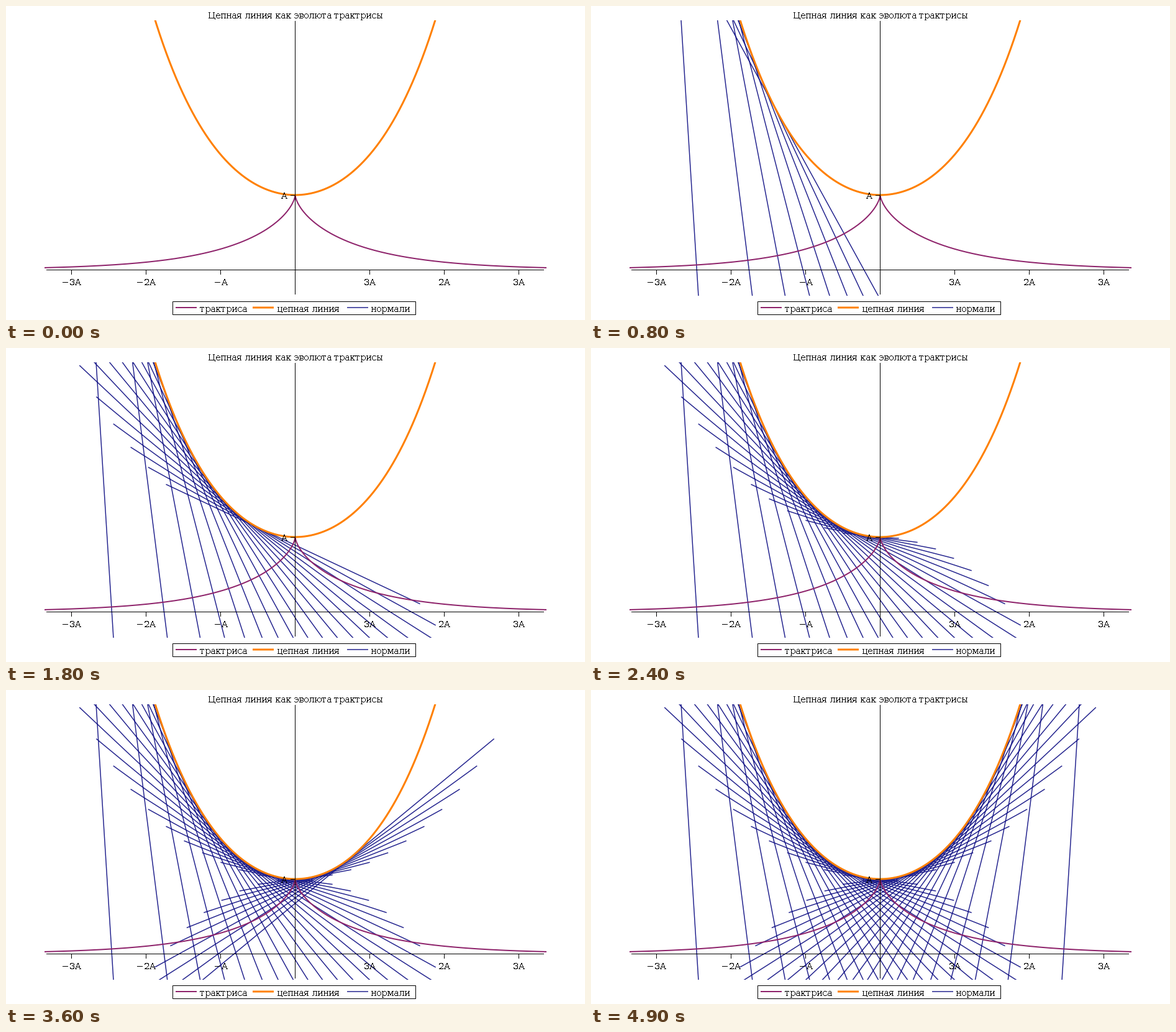
A matplotlib script for the animation above (5100 ms loop, 932 px wide and 505 px high).

```python
import numpy as np
import matplotlib.pyplot as plt
from matplotlib.animation import FuncAnimation
from matplotlib.patches import Rectangle

W, H, DPI = 932, 505, 100
PX = 72 / DPI                      # one pixel in points
CX, CY, UX, UY = 465.5, 424.0, 120.1, 120.0
MAROON, ORANGE, NAVY = "#8E236B", "#FF8000", "#23238E"
FRAMES, STEPS = 51, 50

# Crisp, fully hinted text
plt.rcParams.update({"font.family": "DejaVu Serif", "text.antialiased": False,
                     "text.hinting": "native", "text.hinting_factor": 1})
fig = plt.figure(figsize=(W / DPI, H / DPI), dpi=DPI, facecolor="white")
ax = fig.add_axes([0, 0, 1, 1])
ax.set_xlim(0, W)
ax.set_ylim(H, 0)
ax.axis("off")
view = Rectangle((62, 23), 808, 443, transform=ax.transData)


def to_px(x, y):
    return CX + UX * np.asarray(x), CY - UY * np.asarray(y)


def curve(x, y, color, width, z):
    line, = ax.plot(*to_px(x, y), color=color, lw=width * PX, zorder=z,
                    solid_capstyle="butt", solid_joinstyle="round",
                    snap=False)
    line.set_clip_path(view)
    return line


def stroke(x0, y0, x1, y1, color="black", width=1):
    ax.plot([x0, x1], [y0, y1], color=color, lw=width * PX, zorder=5,
            solid_capstyle="butt", snap=False)


def label(x, base, text, ha="center"):
    ax.text(x, base, text, ha=ha, va="baseline", fontsize=14 * PX, zorder=6)


def normal(k):
    """Segment through the tractrix point at angle k*pi/STEPS."""
    a = k * np.pi / STEPS
    s = np.array([-4, 4, np.nan])
    x = np.cos(a) + np.log(np.tan(a / 2)) + s * np.cos(a)
    y = np.sin(a) - s * np.cos(a) ** 2 / np.sin(a)
    return x, y


# Curves
t = np.linspace(-5, 5, 1001)
curve(t - np.tanh(t), 1 / np.cosh(t), MAROON, 2, 3)
t = np.linspace(-2.2, 2.2, 401)
curve(t, np.cosh(t), ORANGE, 3, 4)
normals = curve([], [], NAVY, 1.5, 2)

# Axes
stroke(65, 424.5, 866, 424.5)
stroke(CX, 24, CX, 464)
stroke(458, 304.5, 466, 304.5)
label(447.8, 310, "A")
for n, text in [(-3, "−3A"), (-2, "−2A"), (-1, "−A"),
                (1, "3A"), (2, "2A"), (3, "3A")]:
    x = np.floor(CX + n * UX) + 0.5
    stroke(x, 424, x, 432)
    label(x, 449, text)

# Title and legend
label(466, 20, "Цепная линия как эволюта трактрисы")
ax.add_patch(Rectangle((268.5, 475.5), 391, 21, fill=False, ec="black",
                       lw=PX, zorder=5, snap=False))
for x, text, color, width in [(273, "трактриса", MAROON, 2),
                              (397, "цепная линия", ORANGE, 3),
                              (549, "нормали", NAVY, 1.5)]:
    stroke(x, 485, x + 34, 485, color, width)
    label(x + 38.5, 492, text, "left")

segments = [normal(k) for k in range(1, STEPS)]


def update(i):
    shown = segments[:i]
    x = np.concatenate([s[0] for s in shown]) if shown else []
    y = np.concatenate([s[1] for s in shown]) if shown else []
    normals.set_data(*to_px(x, y))
    return normals,


anim = FuncAnimation(fig, update, frames=FRAMES, interval=100, repeat=True,
                     repeat_delay=0, blit=False)
plt.show()
```
